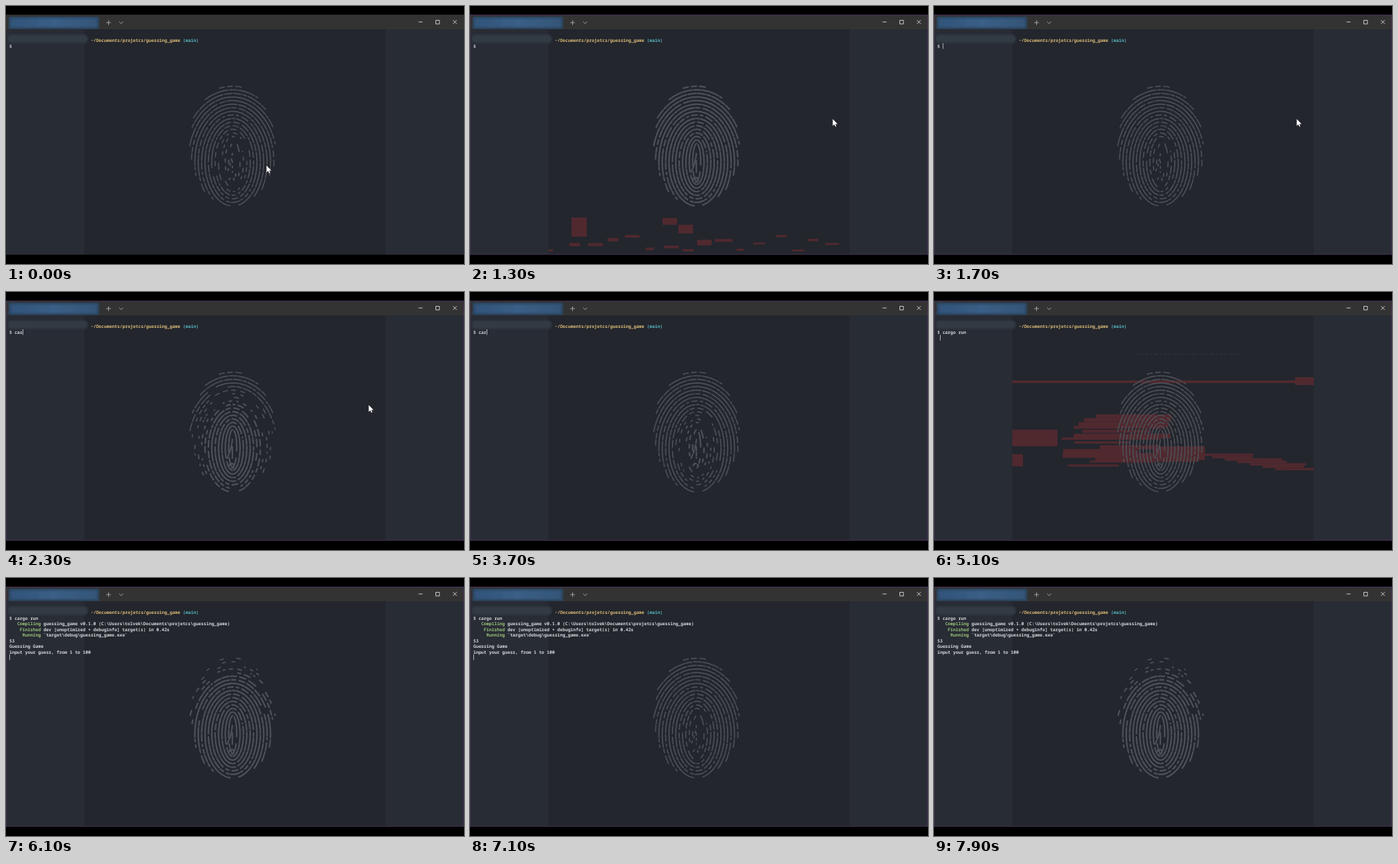
Recreate the animation shown at these times as an HTML page. Size 690 by 388 pixels, loop 8000 ms.

```html
<!DOCTYPE html>
<html lang="en">
<head>
<meta charset="utf-8">
<title>Terminal</title>
<style>
  html, body { margin: 0; width: 100%; height: 100%; overflow: hidden; background: #000; }
  svg { display: block; width: 100vw; height: 100vh; }
  text {
    font: bold 6.6px "Noto Sans Mono", "DejaVu Sans Mono", monospace;
    fill: #d4d7dc; white-space: pre; text-rendering: geometricPrecision;
  }
  .path { fill: #dcbb78; }
  .branch { fill: #56b6c2; }
  .ok { fill: #98c379; }
  .icon { fill: none; stroke: #d0d0d0; stroke-width: 1; }
  .dim { stroke: #a6a6a6; }
</style>
</head>
<body>
<svg viewBox="0 0 690 388">
  <defs>
    <linearGradient id="tabFill">
      <stop offset="0" stop-color="#30547a"/>
      <stop offset=".5" stop-color="#3a5e86"/>
      <stop offset="1" stop-color="#345677"/>
    </linearGradient>
    <filter id="soft" x="-10%" y="-50%" width="120%" height="200%"><feGaussianBlur stdDeviation="1.8"/></filter>
    <clipPath id="panel"><rect x="118" y="35" width="454" height="339"/></clipPath>
  </defs>
  <rect width="690" height="388"/>
  <rect y="13" width="690" height="361" fill="#282c34"/>
  <rect x="118" y="35" width="454" height="339" fill="#23262d"/>
  <rect y="13" width="690" height="22" fill="#333"/>

  <rect x="4" y="16" width="136.500" height="18.500" rx="2" fill="#2b4560"/>
  <rect x="7" y="18.500" width="130" height="13.500" rx="3" fill="url(#tabFill)" filter="url(#soft)"/>
  <rect x="3" y="43" width="120" height="12.500" rx="5" fill="#333a43" filter="url(#soft)"/>

  <g class="icon">
    <path class="dim" d="M154.500 21.500v7M151 25h7M170.500 23.500l3 3 3-3"/>
    <path d="M621.500 24h6M647.500 21.500h5.500v5.500h-5.500zM673.500 21.200l5.600 5.600M679.100 21.200l-5.600 5.600"/>
  </g>

  <g clip-path="url(#panel)" fill="#50292f">
    <g id="blocks"><path d="M153 318h23v29h-23zM290 319h22v10h-22zM314 329h22v13h-22zM342 352h22v8h-22z"/></g>
    <g id="bars">
      <path d="M118 133H544V128H572V140H118V137H428z" fill-rule="evenodd" display="none"/>
      <path d="M118 133h426v-5h28v12h-28v-3H118zM118 207h68v25h-68zM118 244h16v18h-16zM330 232h78v21h-78z"/>
      <path d="M304 93.500H466" stroke="#343740" stroke-dasharray="5 3 2 4"/>
    </g>
  </g>
  <g id="print" fill="none" stroke="#4d5057" stroke-linecap="round"></g>

  <text class="path" x="128" y="54">~/Documents/projetcs/guessing_game</text>
  <text class="branch" x="266.600" y="54">(main)</text>
  <text id="command" x="5" y="62.500"></text>
  <g id="output">
    <text x="16.900" y="71"><tspan class="ok">Compiling</tspan> guessing_game v0.1.0 (C:\Users\tolvek\Documents\projetcs\guessing_game)</text>
    <text x="20.800" y="79.500"><tspan class="ok">Finished</tspan> dev [unoptimized + debuginfo] target(s) in 0.42s</text>
    <text x="24.800" y="88"><tspan class="ok">Running</tspan> `target\debug\guessing_game.exe`</text>
    <text x="5" y="96.500">53</text>
    <text x="5" y="105">Guessing Game</text>
    <text x="5" y="113.500">input your guess, from 1 to 100</text>
  </g>
  <rect id="caret" width=".9" height="8.500" fill="#c4c7cc"/>

  <rect id="frame" x=".5" y="13.500" width="689" height="360" fill="none" stroke="#443055"/>
  <path id="mouse" d="M0 0V10.200L2.400 8 4 11.500 5.400 10.900 3.900 7.500H7.200Z" fill="#fff"/>
</svg>
<script>
const LOOP = 8000, CHAR = 3.96;
const $ = id => document.getElementById(id);
const clamp = v => Math.max(0, Math.min(1, v));
const show = (el, on) => el.setAttribute('display', on ? 'inline' : 'none');

function add(parent, tag, attrs) {
  const el = document.createElementNS('http://www.w3.org/2000/svg', tag);
  for (const key in attrs) el.setAttribute(key, attrs[key]);
  return parent.appendChild(el);
}

let seed = 7;
const rand = () => (seed = (seed * 16807) % 2147483647) / 2147483647;
const between = (low, high) => low + (high - low) * rand();
const rect = (id, x, y, width, height) => add($(id), 'rect', { x, y, width, height });

// Glitches: small blocks low in the panel, and long bars that trail off to the right
for (let i = 0; i < 16; i++)
  rect('blocks', 118 + 28 * i + between(-8, 8), between(343, 368), between(10, 28), between(2, 6));
for (let i = 0; i < 14; i++)
  rect('bars', between(185, 250), 184 + 5.8 * i, between(70, 165), between(3, 8));
for (let i = 0; i < 7; i++)
  rect('bars', 400 + 19 * i, 243 + 3.6 * i, between(50, 100), 3.5);

// Concentric ridges, cut off by the oval outline of the finger
const CX = 341.5, CY = 235, RINGS = 17;
const inside = (x, y) => ((x - CX) / 65) ** 2 + ((y - 210) / 90.5) ** 2 < 1;

function makeRing(_, j) {
  const rx = 6 + 5.1 * j, ry = 28 + 5.4 * j, pieces = [];
  const start = between(0, 6), end = start + 2 * Math.PI;
  for (let a = start; a < end;) {
    const speed = Math.hypot(rx * Math.sin(a), ry * Math.cos(a));
    const span = Math.min(between(8, 17) / speed, end - a);
    const mid = a + span / 2, gap = rand() < 0.6 ? 0 : 5 / speed;
    const keep = rand();
    if (inside(CX + rx * Math.cos(mid), CY + ry * Math.sin(mid)))
      pieces.push({ mid, half: Math.max(0.01, (span - gap) / 2), keep });
    a += span;
  }
  return { j, rx, ry, pieces, el: add($('print'), 'path', {}) };
}
const rings = Array.from({ length: RINGS }, makeRing);
const core = add($('print'), 'path', {
  d: 'M341 222Q340 236 333 250M341 233V250M336.500 261a3.500 3.500 0 1 1 3.500 4'
});

function drawPrint(t) {
  // A gap travels outwards through the ridges and leaves them thicker behind it
  const phase = (t / 1000) % 1.8;
  const u = phase >= 1.3 ? phase - 1.8 : phase;
  const front = 1.15 * (1 + 10 * u + 8 * u * Math.abs(u));
  const ramp = clamp((u + 0.3) / 0.25);
  const fade = j => ramp * clamp(1.3 * Math.exp(-(((j - front) / 2.4) ** 2)));
  const width = j => 1.7 + 0.6 * Math.max(u < 0 ? 0 : clamp((front - j) / 3 + 0.5), clamp((-0.3 - u) / 0.2));

  for (const { j, rx, ry, pieces, el } of rings) {
    const f = fade(j);
    const point = a => `${(CX + rx * Math.cos(a)).toFixed(2)} ${(CY + ry * Math.sin(a)).toFixed(2)}`;
    el.setAttribute('d', pieces.filter(p => p.keep >= f * 0.5).map(p => {
      const half = p.half * (1 - 0.65 * f);
      return `M${point(p.mid - half)}A${rx} ${ry} 0 0 1 ${point(p.mid + half)}`;
    }).join(''));
    el.setAttribute('stroke-width', width(j));
  }
  const f = fade(0);
  core.setAttribute('stroke-width', width(0));
  core.setAttribute('stroke-dasharray', f > 0.05 ? `${8 - 6 * f} ${6 * f}` : 'none');
}

// Bursts of keys: start, time per key, keys ('<' deletes)
const bursts = [[1850, 200, 'cas'], [3100, 400, '<r'], [3850, 120, 'go run']];
const ENTER = 4750, DONE = 5550;

function typedAt(t) {
  let typed = '';
  for (const [start, step, keys] of bursts)
    for (const key of keys.slice(0, Math.max(0, Math.floor((t - start) / step) + 1)))
      typed = key === '<' ? typed.slice(0, -1) : typed + key;
  return typed;
}

function drawTerminal(t) {
  const typed = typedAt(t);
  $('command').textContent = '$ ' + typed;
  show($('output'), t >= DONE);

  let x = 5.3 + CHAR * (2 + typed.length), y = 56, on = t >= 1500;
  if (t >= DONE) {
    x = 5; y = 115;
    on = t < 5900 || (t - 5900) % 1060 < 530;
  } else if (t >= ENTER) {
    x = 9; y = 64.5;
  }
  $('caret').setAttribute('x', x);
  $('caret').setAttribute('y', y);
  show($('caret'), on);
}

function drawMouse(t) {
  const k = clamp((t - 150) / 650), e = k * k * (3 - 2 * k);
  $('mouse').setAttribute('transform', `translate(${392.5 + 154 * e} ${240 - 70 * e})`);
  show($('mouse'), t < 2500);
}

function render(t) {
  const glitch = t % 3600;
  show($('blocks'), glitch >= 1200 && glitch < 1400);
  show($('bars'), glitch >= 1400 && glitch < 1600);
  show($('frame'), t >= 800);
  drawPrint(t);
  drawTerminal(t);
  drawMouse(t);
}

const began = performance.now();
function tick() {
  render((performance.now() - began) % LOOP);
  requestAnimationFrame(tick);
}
tick();
</script>
</body>
</html>
```
